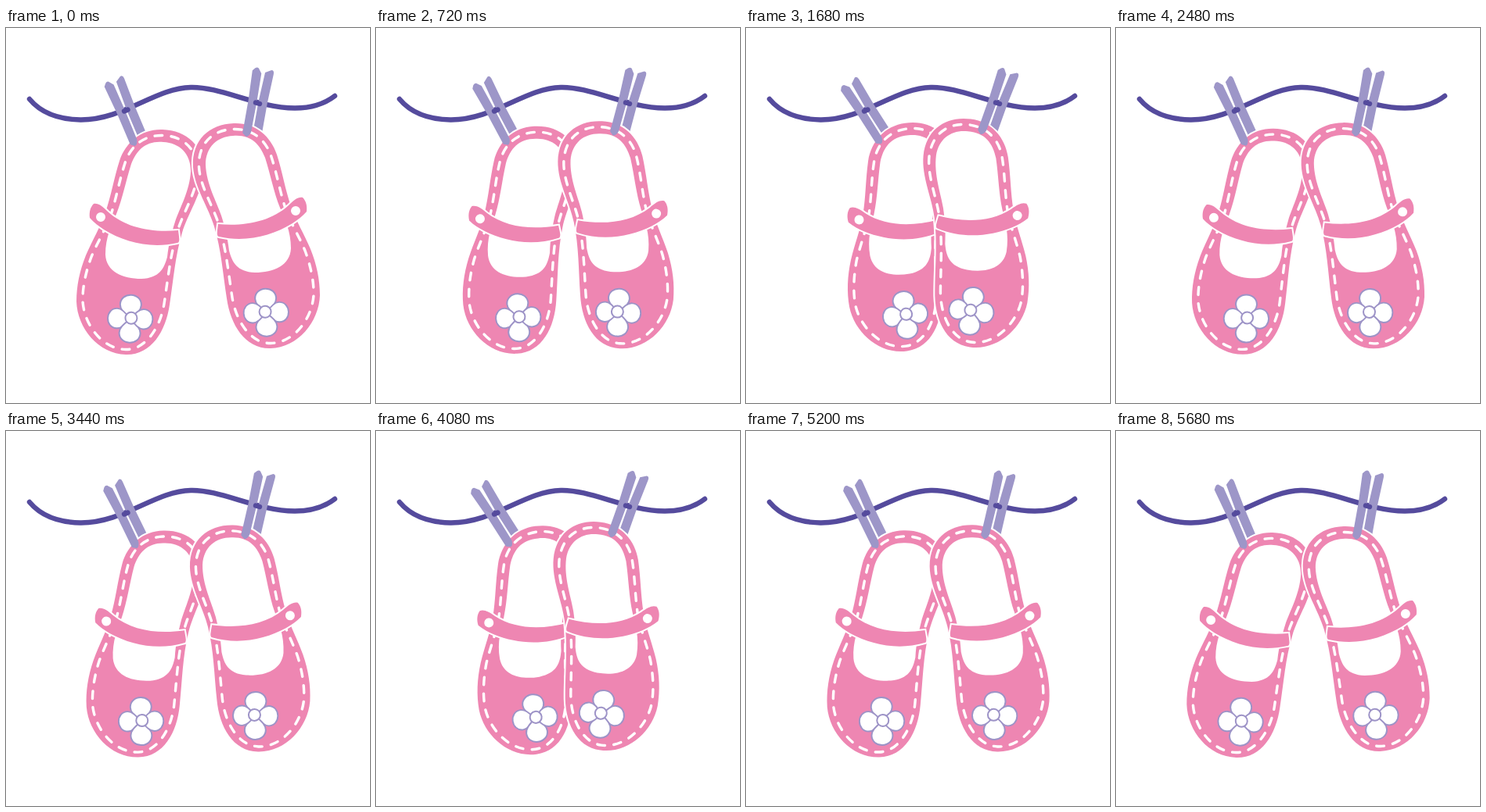
Write an HTML page that moves like this. It is 465 px wide and 480 px high and loops after 5.76 s.

```html
<!DOCTYPE html>
<html lang="en">
<head>
<meta charset="utf-8">
<title>Shoes on a line</title>
<style>
  html, body { margin: 0; width: 100%; height: 100%; overflow: hidden; background: #fff; }
  svg { display: block; width: 465px; height: 480px; }
  .pink { fill: #ee86b2; stroke: #fff; stroke-width: 4; paint-order: stroke; }
  .white { fill: #fff; }
  .stitch { fill: none; stroke: #fff; stroke-width: 3.4; stroke-linecap: round; stroke-dasharray: 4.6 5.4; stroke-dashoffset: 2.3; }
  .flower { fill: #fff; stroke: #9d93c7; stroke-width: 2; stroke-linejoin: round; }
  .arm { fill: #9d96c8; }
  .rope { fill: none; stroke: #554b9d; stroke-width: 6.4; stroke-linecap: round; }
</style>
</head>
<body>
<svg viewBox="0 0 465 480">
  <defs>
    <path id="front" class="arm" d="M-13.5 -38L-10.5 -41.5Q-8 -43.5 -6 -42L-1.5 -36L-1 0L-1.5 40Q-3 46 -7 47L-12 43L-12 0Z"/>
    <path id="back" class="arm" d="M3 -38L10.5 -42.5Q14 -43 14 -38L12.5 0L12.5 37L1 37L1 0Z"/>
    <path id="petal" d="M0 0C-9 -8 -13.5 -12 -13.5 -18C-13.5 -26 -7 -30.5 0 -30.5C7 -30.5 13.5 -26 13.5 -18C13.5 -12 9 -8 0 0Z"/>
    <g id="shoe">
      <path class="pink" d="M291 122C318 121 338 138 346 162C353 184 357 208 364 228C370 246 381 264 389 283C397 303 401 322 401 342C400 376 373 409 338 410C306 411 287 381 282 346C277 314 275 284 266 254C259 230 241 205 239 178C237 143 260 123 291 122Z"/>
      <path class="white" d="M290 138C312 136 324 148 331 166C338 188 342 210 350 230C356 244 364 260 364 282C363 304 342 313 318 313C295 312 289 300 285 285C283 268 280 256 275 240C269 222 256 200 255 175C255 152 270 139 290 138Z"/>
      <path class="stitch" pathLength="320" d="M338 403.5C313 404 294 376 289 345C284 312 281 282 272 252C265 229 248 203 246.5 178C245 147 265 130 291 129.5C315 129 332 143 339 165C346 186 350 210 357 231C363 248 374 266 382 285C389 304 393.5 324 393 342C391 372 368 403 338 403.5Z"/>
      <path class="pink" d="M271 251C305 254 338 248 361 227C368 220 373 216 379 217C383 221 385 227 384 235C379 241 372 246 366 250C340 266 306 275 272 267Q269 267 270 259Z"/>
      <circle class="white" cx="370" cy="234" r="6"/>
      <g class="flower" transform="translate(332.3 364.2) rotate(-2)">
        <use href="#petal"/>
        <use href="#petal" transform="rotate(90) scale(.94)"/>
        <use href="#petal" transform="rotate(180)"/>
        <use href="#petal" transform="rotate(270) scale(.94)"/>
        <circle cx="-1.2" cy="-1" r="7.5"/>
      </g>
    </g>
  </defs>
  <path class="rope" d="M30 91C45 109 68 117 95 117.5C150 118 190 77 236 76C275 75 320 102 369 102.5C390 102.5 407 97 420 87"/>
  <g id="left">
    <use href="#back" transform="translate(153 105) rotate(-23)"/>
    <use href="#shoe" transform="matrix(-1 0 0 1 491 8)"/>
    <use href="#front" transform="translate(153 105) rotate(-23)"/>
  </g>
  <g id="right">
    <use href="#back" transform="translate(321.5 94) rotate(10)"/>
    <use href="#shoe"/>
    <use href="#front" transform="translate(321.5 94) rotate(10)"/>
  </g>
  <path class="rope" d="M151 106.5L155.5 104.5M319 95.5L324 97"/>
</svg>
<script>
  const STEP = 80, HALF = 1440, LAG = 10;
  const left = document.getElementById('left');
  const right = document.getElementById('right');
  const easeInOut = x => x < 0.5 ? 2 * x * x : 1 - 2 * (1 - x) ** 2;

  // 0 = toes apart, 1 = toes together
  function swing(ms) {
    const phase = Math.abs(ms - LAG) / HALF % 2;
    return easeInOut(phase < 1 ? phase : 2 - phase);
  }

  const start = performance.now();
  function draw() {
    const elapsed = performance.now() - start;
    const s = swing(Math.floor(elapsed / STEP) * STEP);
    left.setAttribute('transform', `rotate(${-10.2 * s} 153 105)`);
    right.setAttribute('transform', `rotate(${10 * s} 321.5 96)`);
    requestAnimationFrame(draw);
  }
  draw();
</script>
</body>
</html>
```
